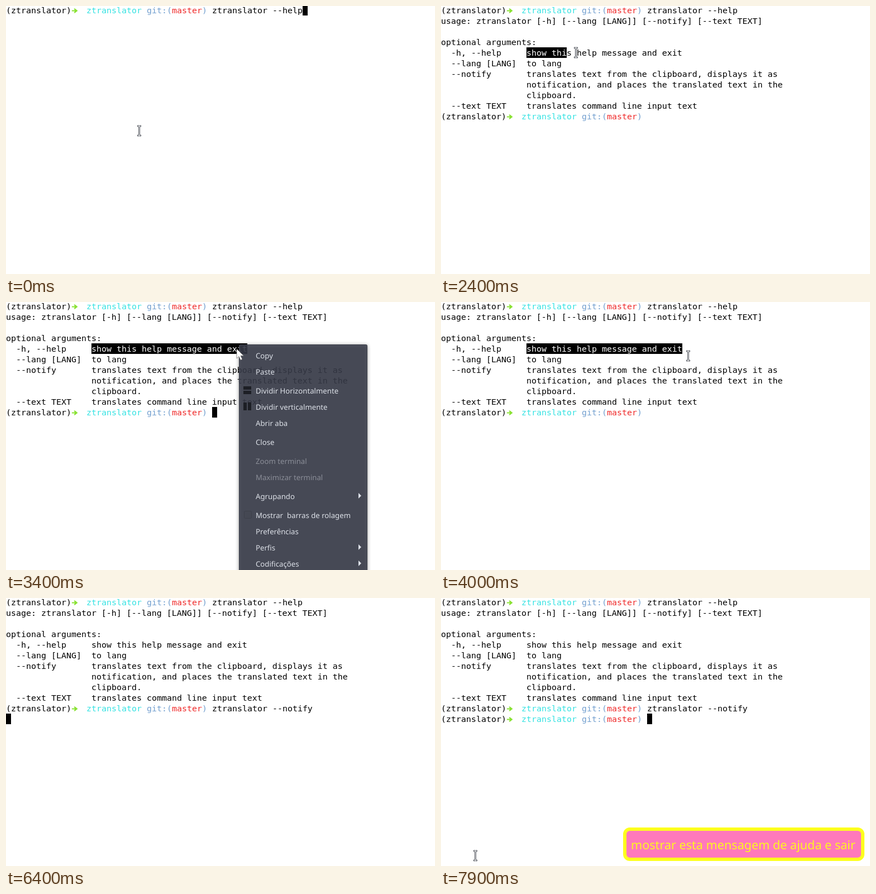
Recreate the animation shown at these times as an HTML page. Size 768 by 480 pixels, loop 8000 ms.

```html
<!DOCTYPE html>
<html lang="en">
<head>
<meta charset="utf-8">
<title>ztranslator</title>
<style>
html, body { margin: 0; width: 100%; height: 100%; overflow: hidden; background: #fff; }
svg { display: block; width: 768px; height: 480px; }
text { white-space: pre; }
.term { font: 14.95px "DejaVu Sans Mono", monospace; }
.menu { font: 13.2px "Noto Sans", sans-serif; fill: #dde1e8; text-rendering: geometricPrecision; }
.menu.off { fill: #8b8e98; }
.note { font: 21.6px "Noto Sans", sans-serif; fill: #fdf620; text-rendering: geometricPrecision; }
</style>
</head>
<body>
<svg id="stage" viewBox="0 0 768 480"></svg>
<script>
const LOOP = 8000, STEP = 100, COL = 9, ROW = 19;
const stage = document.getElementById('stage');

function add(parent, tag, attrs = {}, text) {
  const el = document.createElementNS('http://www.w3.org/2000/svg', tag);
  for (const k in attrs) el.setAttribute(k, attrs[k]);
  if (text !== undefined) el.textContent = text;
  parent.append(el);
  return el;
}
const group = () => add(stage, 'g');
const box = (parent, x, y, width, height, fill, more) =>
  add(parent, 'rect', { x, y, width, height, fill, ...more });
const show = (el, on) => el.setAttribute('visibility', on ? 'visible' : 'hidden');
const term = (parent, col, row, text, fill = '#000') =>
  add(parent, 'text', { class: 'term', x: col * COL, y: row * ROW + 13, fill }, text);

function prompt(parent, row) {
  term(parent, 0, row, '(ztranslator)');
  const y = row * ROW + 8.5;
  add(parent, 'path', {
    d: `M118 ${y - 1}h5l-1.5-3h2l5 4-5 4h-2l1.5-3h-5z`, fill: '#8ae234'
  });
  term(parent, 16, row, 'ztranslator', '#34e2e2');
  term(parent, 28, row, 'git:(', '#729fcf');
  term(parent, 33, row, 'master', '#ef2929');
  term(parent, 39, row, ')', '#729fcf');
}

// Terminal
const PHRASE = 'show this help message and exit';
const TAB = 17, CMD = 41;
const HELP = `usage: ztranslator [-h] [--lang [LANG]] [--notify] [--text TEXT]

optional arguments:
  -h, --help|${PHRASE}
  --lang [LANG]|to lang
  --notify|translates text from the clipboard, displays it as
|notification, and places the translated text in the
|clipboard.
  --text TEXT|translates command line input text`;

prompt(stage, 0);
term(stage, CMD, 0, 'ztranslator --help');
const output = group();
HELP.split('\n').forEach((line, i) => {
  const [left, right = ''] = line.split('|');
  term(output, 0, i + 1, left);
  term(output, TAB, i + 1, right);
});
prompt(output, 10);
const command = term(stage, CMD, 10, '');
const nextPrompt = group();
prompt(nextPrompt, 11);

const selBox = box(stage, TAB * COL, 74, 0, ROW, '#000');
const selText = term(stage, TAB, 4, '', '#fff');
const caret = box(stage, 0, 0, COL, ROW, '#000');

// Context menu: '-' is a separator, '~' disabled, '>' a submenu
const ITEMS = 'Copy,Paste,-,Dividir Horizontalmente,Dividir verticalmente,Abrir aba,-,Close,-,' +
  '~Zoom terminal,~Maximizar terminal,-,>Agrupando,-,Mostrar  barras de rolagem,' +
  'Preferências,>Perfis,>Codificações';
const menu = group();
box(menu, 417.5, 76.5, 229, 420, 'rgba(56,60,74,.86)', {
  rx: 2, stroke: '#3b3e49', style: 'filter:drop-shadow(0 1px 3px rgba(0,0,0,.45))'
});
const hover = box(menu, 418, 82, 228, 29, '#5294e2');
let y = 96;
for (const item of ITEMS.split(',')) {
  if (item === '-') { y += 5; continue; }
  const off = item[0] === '~', sub = item[0] === '>';
  add(menu, 'text', { class: off ? 'menu off' : 'menu', x: 447, y: y + 5 }, item.replace(/^[~>]/, ''));
  if (sub) add(menu, 'path', { d: `M631 ${y - 6}l5 5-5 5z`, fill: '#dde1e8' });
  y += 29;
}
for (const k of [0, 8]) {
  box(menu, 425, 151 + k, 14, 6, '#1d1f25');
  box(menu, 425 + k, 180, 6, 14, '#1d1f25');
}
box(menu, 426.5, 374.5, 13, 13, '#454853', { rx: 2, stroke: '#3d404a' });

// Notification
const note = group();
box(note, 329, 414, 426, 54, '#ff79bb', { rx: 9, stroke: '#fdff1e', 'stroke-width': 6 });
add(note, 'text', { class: 'note', x: 340, y: 450 }, 'mostrar esta mensagem de ajuda e sair');

// Mouse shapes
const beam = add(stage, 'path', {
  d: 'M-3.5-10h2.4l.6.6.6-.6H2.5v2H.5v15h2v2H.1l-.6-.6-.6.6h-2.4v-2h2v-15h-2z',
  fill: '#fff', stroke: '#4c5058'
});
const arrow = add(stage, 'path', {
  d: 'M0 0V17l4-3.5 3 6.5 3-1.4-3-6.3h5.5z', fill: '#fff', stroke: '#666', 'stroke-width': .7
});

// Each move starts at a time and place and eases out to another place
const MOVES = [
  { at: 0, ms: 400, from: [239, 224], to: [239, 224] },
  { at: 1300, ms: 800, from: [239, 224], to: [150, 83], pow: 1.5 },
  { at: 2200, ms: 800, from: [150, 83], to: [431, 85], pow: 1.377 },
  { at: 3200, ms: 200, from: [431, 85], to: [413, 84] },
  { at: 3400, ms: 400, from: [413, 84], to: [449, 97], pow: 1.5 },
  { at: 3800, ms: 200, from: [449, 97], to: [443, 97] },
  { at: 4000, ms: 500, from: [443, 97], to: [153, 256], pow: 1.8 },
  { at: 7000, ms: 950, from: [153, 256], to: [61, 464], pow: 1.6 }
];
const mouseShown = t => t < 400 || t >= 1400 && t < 5300 || t >= 7100;

function mouseAt(t) {
  const { at, ms, from, to, pow = 1 } = MOVES.findLast(m => t >= m.at);
  const k = 1 - (1 - Math.min(1, (t - at) / ms)) ** pow;
  return from.map((v, i) => Math.round(v + (to[i] - v) * k));
}

// The selection trails the mouse a little
function selected(t) {
  if (t < 2300 || t >= 4500) return 0;
  const x = mouseAt(Math.min(t - 40, 3100))[0];
  return Math.round((x - TAB * COL) / COL);
}

// Every key press restarts the caret blink
const KEYS = [-500, 500, 5400, 5900, 6400], BLINK = 615;
const caretOn = t => {
  const key = KEYS.findLast(k => t >= k);
  return Math.floor((t + STEP / 2 - key) / BLINK) % 2 === 0;
};

const DONE = 7300;

function caretAt(t, typed) {
  if (t < 500) return [59, 0];
  if (t < 700) return [0, 1];
  if (t < 6400) return [CMD + typed.length, 10];
  return t < DONE ? [0, 11] : [CMD, 11];
}

function draw(t) {
  const typed = t < 5400 ? '' : 'ztranslator --' + (t < 5900 ? 'help' : 'notify');
  const menuOpen = t >= 3400 && t < 3800;
  const mouse = mouseAt(t);

  show(output, t >= 700);
  show(nextPrompt, t >= DONE);
  show(note, t >= DONE);
  show(menu, menuOpen);
  show(hover, menuOpen && mouse[0] > 418);
  command.textContent = typed;

  const n = selected(t);
  selBox.setAttribute('width', n * COL);
  selText.textContent = PHRASE.slice(0, n);

  const [col, row] = caretAt(t, typed);
  show(caret, caretOn(t));
  caret.setAttribute('x', col * COL);
  caret.setAttribute('y', row * ROW - 2);

  show(beam, mouseShown(t) && !menuOpen);
  show(arrow, menuOpen);
  for (const el of [beam, arrow]) el.setAttribute('transform', `translate(${mouse})`);
}

const start = performance.now();
function tick() {
  const t = (performance.now() - start) % LOOP;
  draw(Math.floor(t / STEP) * STEP);
  requestAnimationFrame(tick);
}
tick();
</script>
</body>
</html>
```
